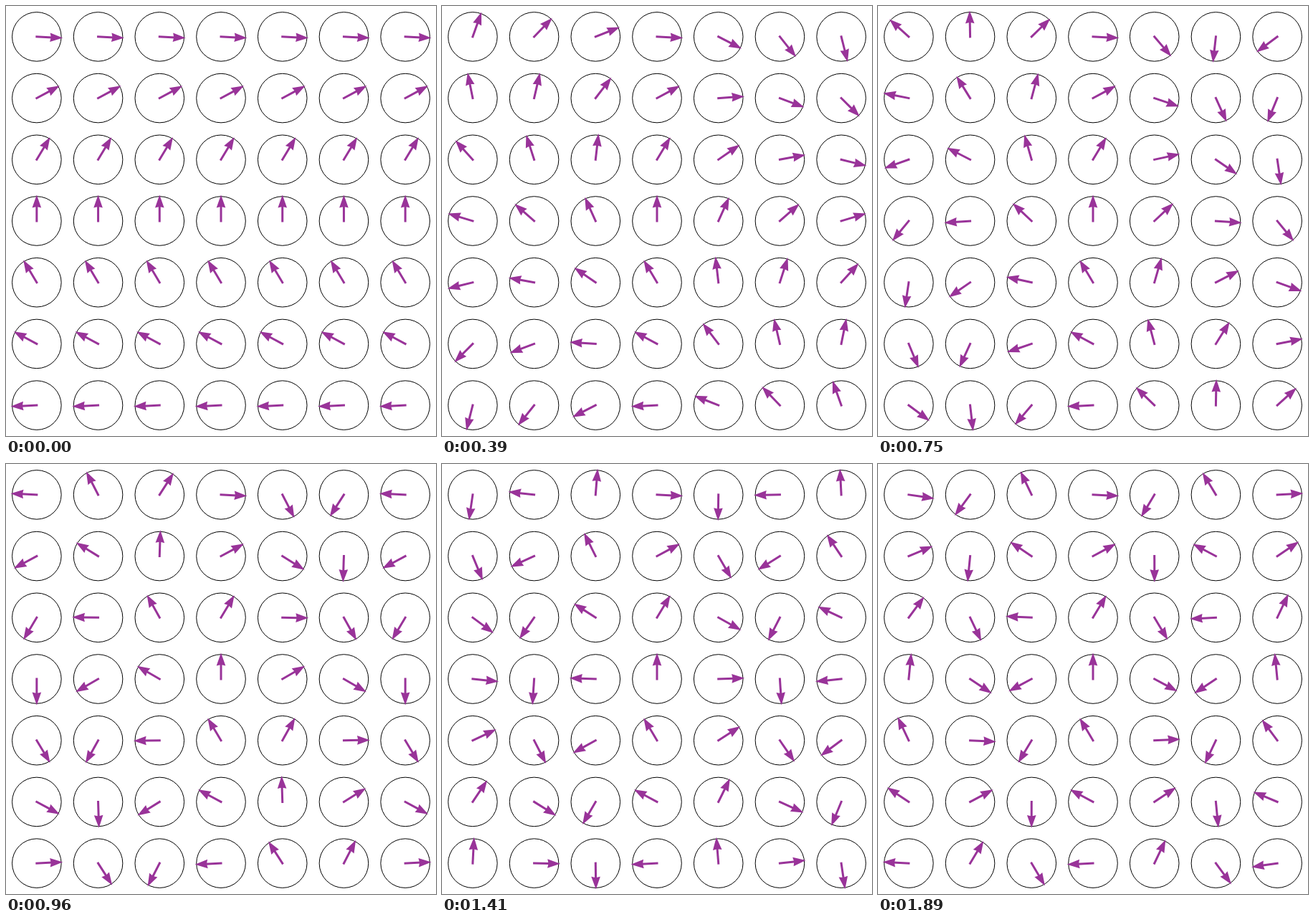
An HTML page with a canvas for the animation above (1.92 s loop, 600 px wide and 600 px high).

```html
<!DOCTYPE html>
<html lang="en">
<head>
<meta charset="utf-8">
<title>Rotating arrows</title>
<style>
html, body { margin: 0; width: 100%; height: 100%; overflow: hidden; background: #fff; }
canvas { display: block; }
</style>
</head>
<body>
<canvas id="stage" width="600" height="600"></canvas>
<script>
const ctx = document.getElementById('stage').getContext('2d');
const COUNT = 7, CELL = 600 / COUNT, MID = 3;
const STEP_MS = 30, STEPS = 64;
const RAD = Math.PI / 180;
const ROW_TURN = 30.9, COLUMN_TURN = 120; // degrees per row; per column over one loop

function drawDial(x, y, degrees) {
  ctx.save();
  ctx.translate(x, y);
  ctx.lineWidth = 1;
  ctx.strokeStyle = '#000';
  ctx.beginPath();
  ctx.arc(0, 0, CELL * 0.4, 0, 2 * Math.PI);
  ctx.stroke();

  ctx.rotate(-degrees * RAD);
  ctx.lineWidth = 3;
  ctx.strokeStyle = ctx.fillStyle = '#993399';
  ctx.beginPath();
  ctx.moveTo(-1.5, 0);
  ctx.lineTo(22, 0);
  ctx.stroke();
  ctx.beginPath();
  ctx.moveTo(36.4, 0);
  ctx.lineTo(18.6, 6.3);
  ctx.lineTo(20, 0);
  ctx.lineTo(18.6, -6.3);
  ctx.fill();
  ctx.restore();
}

function draw() {
  const step = Math.floor(performance.now() / STEP_MS) % STEPS;
  const spread = COLUMN_TURN * step / STEPS;
  ctx.fillStyle = '#fff';
  ctx.fillRect(0, 0, 600, 600);
  for (let row = 0; row < COUNT; row++) {
    for (let col = 0; col < COUNT; col++) {
      const degrees = 90 + (row - MID) * ROW_TURN + (MID - col) * spread;
      drawDial((col + 0.5) * CELL, (row + 0.5) * CELL, degrees);
    }
  }
  requestAnimationFrame(draw);
}
draw();
</script>
</body>
</html>
```
